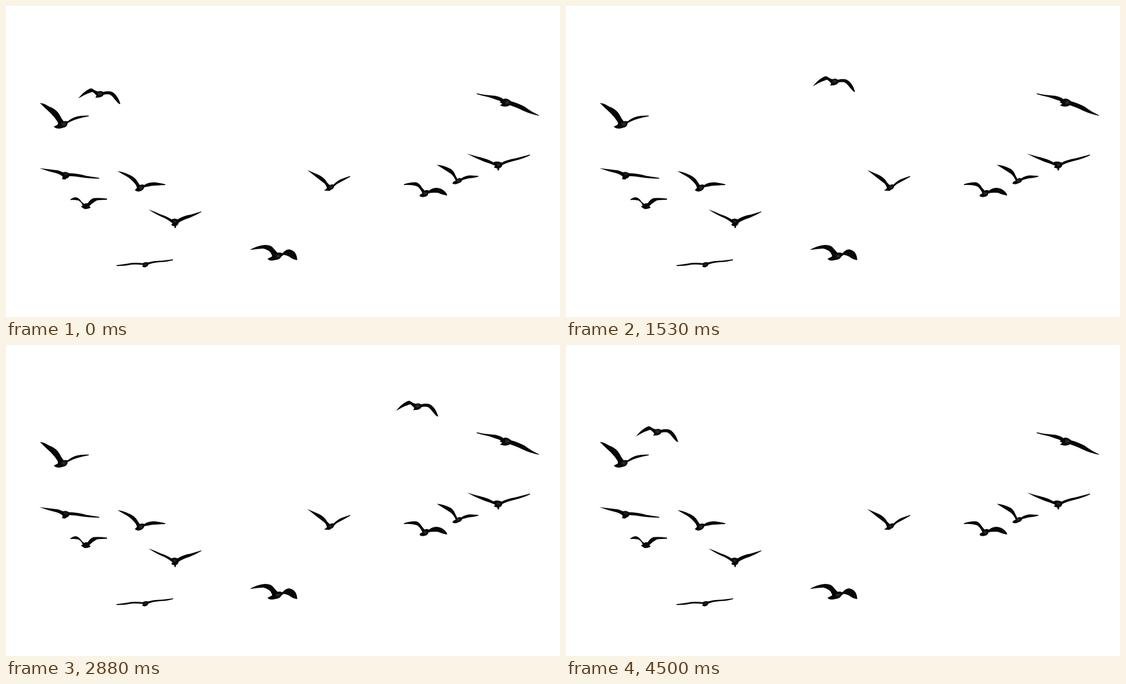
An HTML page that plays this animation: 998x561 px, repeating every 4.53 s.

```html
<!DOCTYPE html>
<html lang="en">
<head>
<meta charset="utf-8">
<title>Flock</title>
<style>
  html, body { margin: 0; width: 100%; height: 100%; overflow: hidden; background: #fff; }
  svg { display: block; width: 998px; height: 561px; }
  path { fill: #070708; filter: blur(.35px); }
  ellipse { fill: #2b2b2e; filter: blur(1px); }
</style>
</head>
<body>
<svg viewBox="0 0 998 561">
  <g>
    <path d="M61 175Q68 175 77 181Q91 186 97 197Q101 205 104 208Q108 207 111 208Q122 199 136 198L149 197.5V199Q133 202 122 206L111 211Q111 218 103 219.5Q95 222.5 89 220L86 217.5L93 214Q94 213 93 209Q87 200 80 193Q70 184 61 175Z"/>
    <ellipse cx="104" cy="213" rx="4" ry="3"/>
    <path d="M60 292.5Q82 295 94 296.5L103 300Q108 298 113 301.5Q130 302 145 306.5L168 310V311.5Q150 311 135 309Q122 306.5 114 307Q112 311 108 311.5L107 313L101 312.5L102 308Q100 305 92 302Q75 298 60 292.5Z"/>
    <ellipse cx="108" cy="303" rx="3" ry="2"/>
    <path d="M201 298Q211 299 221 304Q232 308 237 317L241 323Q246 321 249 323Q256 318 268 318Q278 319 287 321.5V323Q272 323.5 262 324.5L249 327Q248 332 242 334Q236 336 232 332L236 328Q235 323 231 319Q222 309 213 305Z"/>
    <ellipse cx="243" cy="328" rx="3" ry="3"/>
    <path d="M115 350Q120 345 126 345Q132 346 136 353L141 357Q144 355 147 356Q152 348 158 346.5Q168 345.5 182 347.5V349.5Q168 349.5 163 351Q156 355 150 361Q153 363 152 364Q146 367 141 366L135 362L138 360Q136 354 131 351Q122 349 115 350Z"/>
    <path d="M257 367Q268 371 279 376Q291 380 298 385Q304 382 309 385Q320 378 332 376.5L352 370.5V371.5Q341 378 331 382Q318 386 311 391Q310 396 306 397V400L304 401L303 397Q298 397 298 394L300 392Q290 384 282 381Q268 375 257 367Z"/>
    <ellipse cx="304" cy="389" rx="2.5" ry="2.5"/>
    <path d="M199 467.5Q215 465.5 226 463.5Q240 463 246 464Q251 461 256 462.5Q268 459 280 459.5L301 457V458.5Q288 462 277 462Q265 463 257 466Q255 471 249 471.5L245 470L247 467Q235 466 226 466.5Q212 469.5 199 469Z"/>
    <ellipse cx="251" cy="466" rx="2.5" ry="2"/>
    <path d="M440 439.5Q453 432 466 431Q476 431 480 435Q485 441 489 445Q494 444 498 446Q504 439 510 439Q518 440 522 447Q525 453 524.5 458.5Q516 457 510 452Q504 449 500 449L496 452Q494 457 486 458Q480 460 474 458.5L471 456L479 452Q480 450 476 444Q471 439 463 437.5Q452 438 440 440Z"/>
    <ellipse cx="490" cy="451" rx="4" ry="2.5"/>
    <path d="M543 296Q555 301 565 305.5Q575 311 578 318L583 323Q588 321 590 322Q598 314 607 311L620 306.5V308Q608 315 602 318Q595 321 591 326Q589 331 586 331L583 333.5L573 333L578 329Q577 322 571 318Q559 309 543 296Z"/>
    <ellipse cx="585" cy="327" rx="3" ry="2.5"/>
    <path d="M717 321.5Q727 317.5 739 318Q745 320 749 327L754 333Q758 331 762 333Q768 328 776 328Q786 329 791 335Q795 339 794.5 342Q786 340.5 778 337Q768 336 761 338Q760 343 755 344Q749 346 745 343L746 340L750 338Q748 332 742 326Q732 322 717 323Z"/>
    <ellipse cx="755" cy="338" rx="3" ry="2.5"/>
    <path d="M776 286.5Q786 287 796 291.5Q806 295 809 304L813 312Q817 309 820 311Q827 306 836 305.5L851 306.5V308Q842 310.5 833 311L822 314Q820 319 814 320Q809 323 804 320L806 317L810 315Q808 309 802 303Q793 297 776 286.5Z"/>
    <ellipse cx="815" cy="315" rx="3" ry="2.5"/>
    <path d="M830 266Q843 270 853 272.5Q868 276 878 282Q885 279 893 282.5Q903 277 917 275L944 268V269.5Q930 276 917 279Q903 282 894 287Q893 292 889 292L888 296L886 297L885 293L879 291.5L881 288Q872 284 862 281Q846 275 830 266Z"/>
    <ellipse cx="887" cy="286" rx="3" ry="2.5"/>
    <path d="M848 157.5Q862 161 876 161.5Q888 162 896 168Q902 165 910 172Q922 175 935 182Q945 190 960 197V198Q945 195 932 189Q920 183 908 179Q903 182 897 181.5L890 179.5L894 176L889 174Q893 173 889 171Q880 168 870 164.5Q858 162 848 159Z"/>
    <ellipse cx="903" cy="174" rx="4" ry="3"/>
  </g>
  <g id="flyer">
    <path d="M130 167C137 158 146 150 154 148.5L160 152Q163 154 166 154Q171 152 175 155Q184 153 190 154.5C198 158 204 168 206 177L203.5 176.5C196 170 192 161 186 159.5Q180 159 176 160Q174 164 168 165L161 165.5L163 161.5Q160 158 156 155C148 157 140 161 130 167Z"/>
    <ellipse cx="169" cy="158" rx="4" ry="3"/>
  </g>
</svg>
<script>
  const LOOP = 4530, STEP = 30;
  const flyer = document.getElementById('flyer');

  // [time, dx, dy]: out past the right edge, then back in from the left
  const legs = [
    [[0, 0, 0], [270, 68, -42], [540, 136, -31], [750, 185, 0], [1080, 247, -26],
     [1290, 280, -68], [1620, 327, 0], [1800, 350, 36], [1980, 371, 10],
     [2160, 394, -14.5], [2310, 432, -42], [2520, 483, -18], [2700, 527, -15],
     [2760, 543, -12], [3000, 603, -84], [3240, 676, -27], [3270, 693, -23],
     [3330, 727, -18], [3510, 822, -68], [3600, 872, -60]],
    [[3630, -232, -22], [3780, -186, -46], [3840, -170, -56], [3960, -136, -70],
     [4320, -40, -24], [4500, -4, -2], [4530, 0, 0]]
  ];

  const slope = (keys, i, c) => (keys[i + 1][c] - keys[i][c]) / (keys[i + 1][0] - keys[i][0]);

  // Flat at the turning points, so the curve never overshoots a key
  function tangent(keys, i, c) {
    if (i === 0) return slope(keys, 0, c);
    if (i === keys.length - 1) return slope(keys, i - 1, c);
    const a = slope(keys, i - 1, c), b = slope(keys, i, c);
    return a * b <= 0 ? 0 : 2 * a * b / (a + b);
  }

  function sample(keys, t, c) {
    let i = 0;
    while (i < keys.length - 2 && t >= keys[i + 1][0]) i++;
    const span = keys[i + 1][0] - keys[i][0];
    const u = (t - keys[i][0]) / span, v = 1 - u;
    return v * v * ((1 + 2 * u) * keys[i][c] + u * span * tangent(keys, i, c))
         + u * u * ((1 + 2 * v) * keys[i + 1][c] - v * span * tangent(keys, i + 1, c));
  }

  function draw(now) {
    const t = Math.floor((now % LOOP) / STEP) * STEP;
    const keys = legs[t < legs[1][0][0] ? 0 : 1];
    flyer.setAttribute('transform', `translate(${sample(keys, t, 1)} ${sample(keys, t, 2)})`);
  }

  const start = performance.now();
  function tick() {
    draw(performance.now() - start);
    requestAnimationFrame(tick);
  }
  tick();
</script>
</body>
</html>
```
